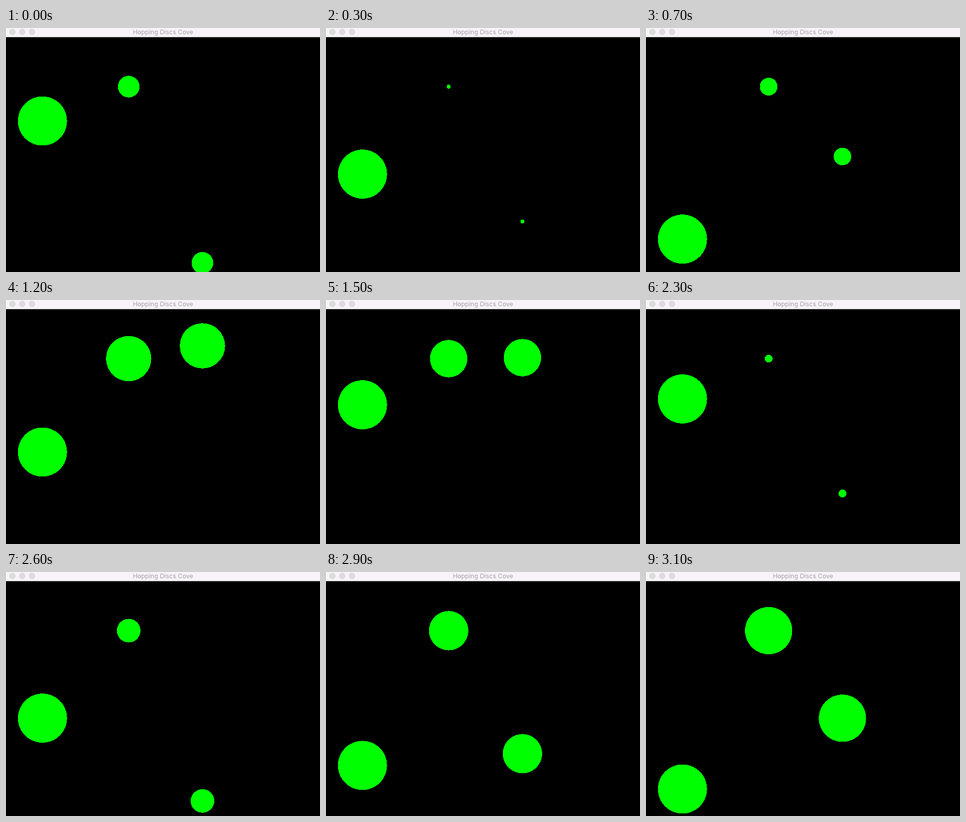
Animation, 600 px wide and 466 px high, one loop 3.2 s. Source, as an HTML page:

```html
<!DOCTYPE html>
<html lang="en">
<head>
<meta charset="utf-8">
<title>Hopping Discs Cove</title>
<style>
  html, body { margin: 0; width: 100%; height: 100%; overflow: hidden; background: #000; }
  svg { display: block; width: 600px; height: 466px; }
  .ball { fill: #0f0; shape-rendering: crispEdges; }
  .bar { fill: #f6f4f6; }
  .button { fill: #dcdadc; }
  text { font: 12px Inter, "Liberation Sans", sans-serif; fill: #a4a2a4; text-anchor: middle; }
</style>
</head>
<body>
<svg viewBox="0 0 600 466">
  <circle class="ball" id="mover" cx="69.7" r="46.9"/>
  <circle class="ball" id="pulser" cx="234.4" cy="112"/>
  <circle class="ball" id="both" cx="375.4"/>
  <rect class="bar" width="600" height="17.5"/>
  <circle class="button" cx="12.2" cy="7.5" r="6"/>
  <circle class="button" cx="31" cy="7.5" r="6"/>
  <circle class="button" cx="49.7" cy="7.5" r="6"/>
  <text x="300" y="12.3">Hopping Discs Cove</text>
</svg>
<script>
  const FRAME = 100, FRAMES = 32;
  const SPEED = 11.28, GROWTH = 1.88; // pixels per tick

  // Most frames advance the balls by three ticks, these by two.
  const SHORT_FRAMES = [4, 9, 13, 18, 25, 29];

  // Turning points as [tick, value]; motion between them is linear.
  const MOVER = [[0, 0], [22, 22], [54, -10], [86, 22], [118, -10]];
  const BOTH = [[0, 35], [1, 36], [37, 0], [72, 35], [107, 0]];
  const SIZE = [[0, 11], [11, 0], [36, 25], [61, 0], [86, 25], [111, 0]];

  const ticksAt = frame => 3 * frame - SHORT_FRAMES.filter(f => f <= frame).length;

  function along(path, tick) {
    const i = path.findIndex(([t]) => t > tick);
    const [t0, v0] = path[i - 1], [t1, v1] = path[i];
    return v0 + (v1 - v0) * (tick - t0) / (t1 - t0);
  }

  const [mover, pulser, both] = ["mover", "pulser", "both"].map(id => document.getElementById(id));
  const start = performance.now();

  function draw() {
    const frame = Math.floor((performance.now() - start) / FRAME) % FRAMES;
    const tick = ticksAt(frame);
    const radius = GROWTH * along(SIZE, tick);
    mover.setAttribute("cy", 177.6 + SPEED * along(MOVER, tick));
    both.setAttribute("cy", 53.7 + SPEED * along(BOTH, tick));
    pulser.setAttribute("r", radius);
    both.setAttribute("r", radius);
    requestAnimationFrame(draw);
  }
  draw();
</script>
</body>
</html>
```
